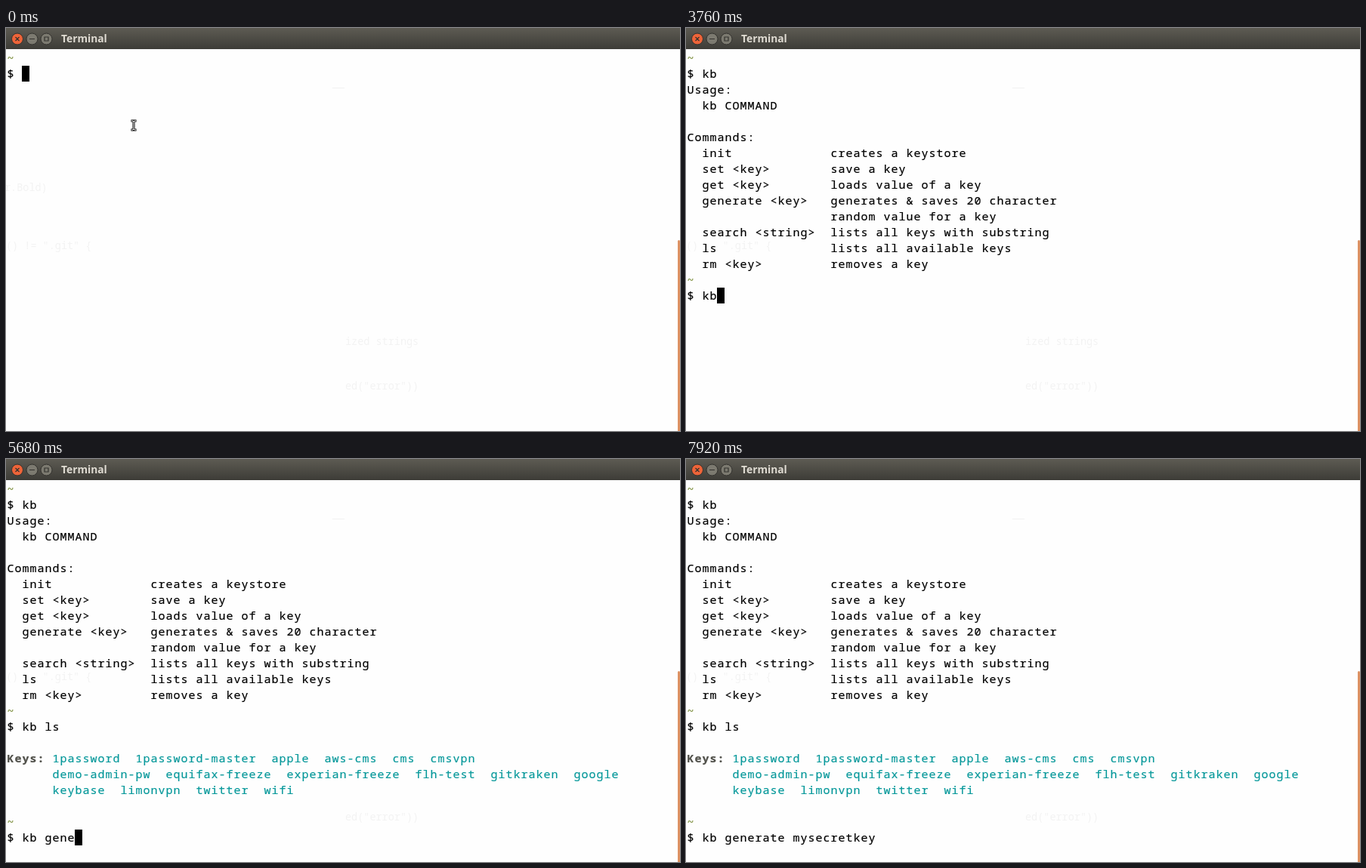
These frames come from a looping animation (892x534 px, 8000 ms). An HTML page:

```html
<!DOCTYPE html>
<html lang="en">
<head>
<meta charset="utf-8">
<title>Terminal</title>
<style>
  html, body { margin: 0; width: 100%; height: 100%; overflow: hidden; background: #fefefe; }
  #stage { position: relative; width: 892px; height: 534px; overflow: hidden; background: #fefefe; }
  #stage > * { position: absolute; margin: 0; }
  #bar { left: 0; top: 0; width: 892px; height: 28px; background: linear-gradient(#5d5b53, #3d3c37); }
  #title { left: 73px; top: 4px; font: 700 13.8px/20px "Open Sans", "Noto Sans", sans-serif; color: #dfdbd2; }
  #icons { left: 0; top: 0; }
  pre { font-family: "Noto Sans Mono", "DejaVu Sans Mono", monospace; }
  #screen { left: 1.5px; top: 29px; font-size: 15px; font-weight: 500; line-height: 21px;
    letter-spacing: 1px; color: #000; -webkit-text-stroke: .2px; }
  .ghost { font-size: 13.5px; line-height: 20px; color: #f3f3f3; }
  .path { color: #7f9040; }
  .label { color: #50504a; font-weight: 700; }
  .keys { color: #06989a; }
  #cursor { width: 10px; height: 21px; background: #000; }
  #scroll { left: 889px; top: 281px; width: 3px; height: 260px; border-radius: 2px; background: #dd9263; }
  #dash { left: 432px; top: 79px; width: 16px; height: 1px; background: #f1f1f1; }
</style>
</head>
<body>
<div id="stage">
  <div id="dash"></div>
  <pre class="ghost" id="bold" style="left:-2px;top:201px">r.Bold)</pre>
  <pre class="ghost" id="git" style="left:0;top:278px"></pre>
  <pre class="ghost" id="strings" style="left:449px;top:405px">ized strings</pre>
  <pre class="ghost" style="left:449px;top:464px">ed("error"))</pre>
  <pre id="screen"></pre>
  <div id="cursor"></div>
  <div id="scroll"></div>
  <div id="bar"></div>
  <div id="title">Terminal</div>
  <svg id="icons" width="200" height="150" fill="none">
    <g stroke="#33322e">
      <circle cx="15" cy="14.5" r="7.5" fill="#ee6439"/>
      <circle cx="34.5" cy="14.5" r="7.5" fill="#7c7a70"/>
      <circle cx="53.5" cy="14.5" r="7.5" fill="#7c7a70"/>
      <path d="M12.5 12l5 5m0-5l-5 5M31 14.5h7M51 12h5v5h-5z" stroke-width="1.2"/>
    </g>
    <g id="mouse">
      <path d="M165.5 123h2.5l1 1 1-1h2.5M169 124v10M165.5 135h2.5l1-1 1 1h2.5" stroke="#000" stroke-width="3"/>
      <path d="M166 123h2l1 1 1-1h2M169 124v10M166 135h2l1-1 1 1h2" stroke="#fff"/>
    </g>
  </svg>
</div>
<script>
const LOOP = 8000, COL = 10, ROW = 21, LEFT = 1, TOP = 29;
const $ = id => document.getElementById(id);
const escape = s => s.replace(/&/g, "&amp;").replace(/</g, "&lt;");
const span = (cls, s) => `<span class="${cls}">${s}</span>`;

const prompt = span("path", "~") + "\n$ ";
const usage = escape(`Usage:
  kb COMMAND

Commands:
  init             creates a keystore
  set <key>        save a key
  get <key>        loads value of a key
  generate <key>   generates & saves 20 character
                   random value for a key
  search <string>  lists all keys with substring
  ls               lists all available keys
  rm <key>         removes a key
`);
const keys = "\n" + span("label", "Keys:") + span("keys",
` 1password  1password-master  apple  aws-cms  cms  cmsvpn
      demo-admin-pw  equifax-freeze  experian-freeze  flh-test  gitkraken  google
      keybase  limonvpn  twitter  wifi`) + "\n\n";

// Scrollback above each of the three prompts
const history = ["", prompt + "kb\n" + usage];
history.push(history[1] + prompt + "kb ls\n" + keys);
const promptRow = [1, 15, 22];
const starts = [0, 2000, 4080];

// [time, characters typed so far]
const commands = [
  ["kb", [[960, 2]]],
  ["kb ls", [[3760, 2], [3840, 3], [4000, 5]]],
  ["kb generate mysecretkey", [
    [5200, 2], [5280, 3], [5440, 4], [5520, 5], [5680, 7], [5760, 8],
    [5920, 10], [6000, 11], [6400, 12], [6640, 14], [6880, 15], [6960, 16],
    [7120, 17], [7200, 18], [7280, 19], [7440, 20], [7520, 21], [7600, 23]]]
];
const blinks = [[320, 720], [1360, 1760], [2400, 2800], [3120, 3520], [4480, 4880], [7920, LOOP]];

const show = (id, on) => { $(id).style.visibility = on ? "visible" : "hidden"; };
let shown = "";

function draw(t) {
  const stage = starts.filter(s => s <= t).length - 1;
  const [text, steps] = commands[stage];
  const typed = steps.reduce((n, [at, count]) => at <= t ? count : n, 0);

  const html = history[stage] + prompt + text.slice(0, typed);
  if (html !== shown) $("screen").innerHTML = shown = html;

  $("cursor").style.left = LEFT + (2 + typed) * COL + "px";
  $("cursor").style.top = TOP + promptRow[stage] * ROW + "px";
  show("cursor", !blinks.some(([off, on]) => t >= off && t < on));
  show("mouse", t < 960);

  // Faint leftovers are wiped where output is printed over them
  show("bold", stage < 1);
  show("strings", stage < 2);
  $("git").textContent = stage < 1 ? '() != ".git" {' : '()    ".git" {'.replace("    ", "   ".padEnd(4));
}

const begin = performance.now();
function frame() {
  draw((performance.now() - begin) % LOOP);
  requestAnimationFrame(frame);
}
frame();
</script>
</body>
</html>
```
